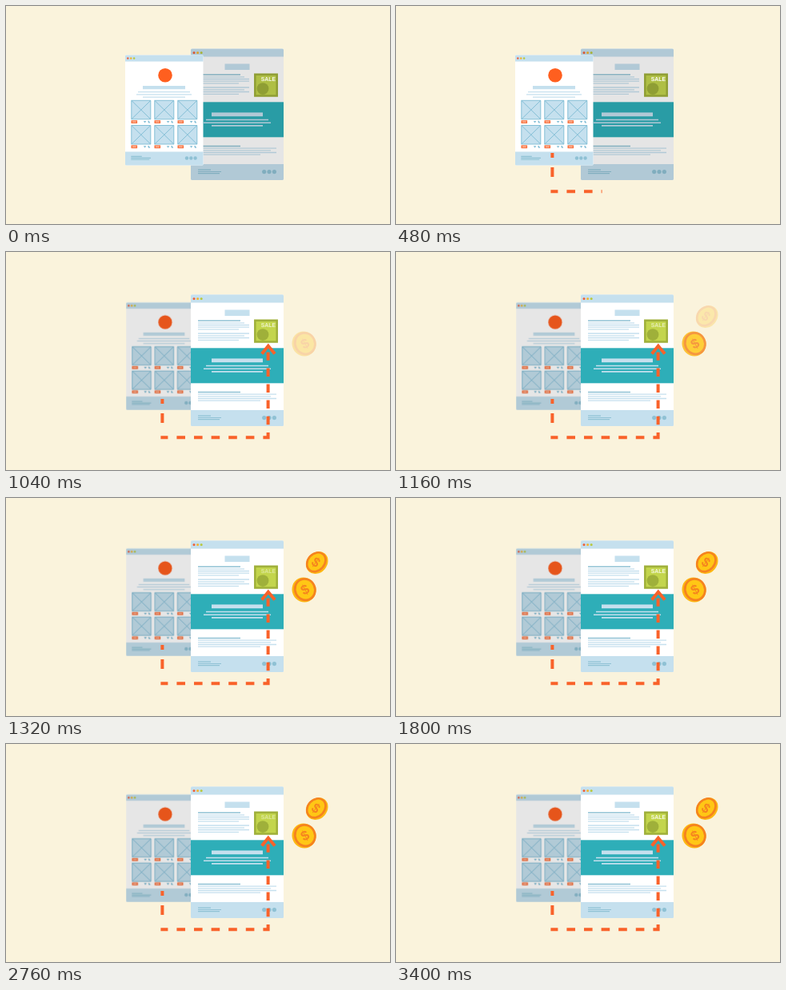
These frames come from a looping animation (480x273 px, 3440 ms). An HTML page:

```html
<!DOCTYPE html>
<html lang="en">
<head>
<meta charset="utf-8">
<title>Email to sale</title>
<style>
  html, body { margin: 0; width: 100%; height: 100%; overflow: hidden; background: #faf3dc; }
  svg { display: block; width: 100%; height: 100%; }

  .pale { fill: #c5e0ee; }
  .ink { fill: #8fc1d4; }
  .rule { stroke: #c5e0ee; stroke-width: 1.3; fill: none; }
  .head { stroke: #8fc1d4; stroke-width: 1.5; fill: none; }
  .thin { stroke: #8fc1d4; stroke-width: 1.1; fill: none; }
  .trail { stroke: #f9622a; stroke-width: 4; fill: none; }
  .sale { font: 900 6.8px "Liberation Sans", Arial, sans-serif; fill: #fff; }
  .dollar { font: 700 17px "Liberation Sans", Arial, sans-serif; fill: #f5831f; text-anchor: middle; }

  .shop, .dim, .front, .reveal, .sale, .coin { animation: 3440ms linear infinite; }
  .shop { animation-name: shrink; transform-origin: 198px 130.5px; }
  .dim { animation-name: dim; }
  .front { animation-name: front; }
  .reveal { animation-name: reveal; stroke-dasharray: 100 110; }
  .sale { animation-name: glow; }
  .first { animation-name: first; }
  .second { animation-name: second; }

  @keyframes shrink { 0%, 17.44% { transform: scale(1); } 29.07%, 100% { transform: scale(.975); } }
  @keyframes dim { 0%, 23.84% { opacity: 0; } 27.9%, 100% { opacity: .1; } }
  @keyframes front { 0%, 23.84% { opacity: 0; } 27.9%, 100% { opacity: 1; } }
  @keyframes reveal { 0%, 4.36% { stroke-dashoffset: 100.5; } 30.35%, 100% { stroke-dashoffset: 0; } }
  @keyframes glow {
    0% { opacity: .9; } 12% { opacity: 1; } 23.3% { opacity: .95; } 38.4% { opacity: .45; }
    58% { opacity: 1; } 66.3% { opacity: .95; } 80.2% { opacity: .45; } 100% { opacity: .9; }
  }
  @keyframes first { 0%, 28.49% { opacity: 0; } 34.88%, 100% { opacity: 1; } }
  @keyframes second { 0%, 32.27% { opacity: 0; } 38.37%, 100% { opacity: 1; } }
</style>
</head>
<body>
<svg viewBox="0 0 480 273" preserveAspectRatio="none">
  <defs>
    <g id="item">
      <path d="M.5.5H24.5V24H.5ZL24.5 24M24.5.5L.5 24" fill="#c5e0ee" stroke="#84bfd6"/>
      <rect x=".2" y="25.4" width="7.6" height="3.8" fill="#f9703c"/>
      <path d="M1.6 27.3H6.4" stroke="#fcd0bd" stroke-width="1.1"/>
      <path d="M15.5 26.2h3.6l-1.8 2.6zM21 26h1.4l1.6 2.7h-2.4z" fill="#84bfd6"/>
    </g>

    <g id="letter">
      <rect x="231" y="53.6" width="116" height="164.4" rx="1.5" fill="#fff"/>
      <path class="pale" d="M231 63.4V55.1q0-1.5 1.5-1.5h113q1.5 0 1.5 1.5v8.3zM231 198h116v18.5q0 1.5-1.5 1.5h-113q-1.5 0-1.5-1.5z"/>
      <circle cx="235" cy="58.5" r="1.5" fill="#f0603a"/>
      <circle cx="239.6" cy="58.5" r="1.5" fill="#f3b52f"/>
      <circle cx="244.2" cy="58.5" r="1.5" fill="#b9c93f"/>
      <rect class="pale" x="273.5" y="72.4" width="31" height="7.6"/>
      <path class="head" d="M240 86h53M240 175.4h53"/>
      <path class="rule" d="M240 88.8h58M240 91.5h64M240 94.2h64M240 96.9h51
        M240 102h64M240 104.8h58M240 107.5h64M240 110.3h51
        M240 178.2h98M240 180.9h91M240 183.5h98M240 186.2h78"/>
      <rect x="311.3" y="85.7" width="27.4" height="26.8" fill="#c3d54d" stroke="#9fb03a" stroke-width="2.5"/>
      <circle cx="321" cy="103.6" r="7.4" fill="#9fb03a"/>
      <rect x="231" y="120.3" width="116" height="44" fill="#2eaeb8"/>
      <rect class="pale" x="257" y="133.4" width="64" height="4.8"/>
      <path class="rule" style="stroke-width:1.6" d="M250 142.5h78M247 146.2h84M257 149.9h64"/>
      <path class="thin" d="M240 205.1h16M240 207.5h29M240 209.6h27"/>
      <g class="ink"><circle cx="322.7" cy="207.6" r="2.6"/><circle cx="329" cy="207.6" r="2.6"/><circle cx="335.4" cy="207.6" r="2.6"/></g>
    </g>

    <mask id="wipe" maskUnits="userSpaceOnUse" x="0" y="0" width="480" height="273">
      <path class="reveal" d="M195.4 184V232.2H327.6V112" pathLength="100" fill="none" stroke="#fff" stroke-width="22"/>
    </mask>
  </defs>

  <rect width="480" height="273" fill="#faf3dc"/>

  <use href="#letter"/>
  <rect x="231" y="53.6" width="116" height="164.4" rx="1.5" opacity=".1"/>

  <g class="shop">
    <rect x="149" y="61.5" width="97.5" height="138" rx="1.2" fill="#fff"/>
    <path class="pale" d="M149 69.5v-6.8q0-1.2 1.2-1.2h95.1q1.2 0 1.2 1.2v6.8zM149 182.4h97.5v15.9q0 1.2-1.2 1.2h-95.1q-1.2 0-1.2-1.2z"/>
    <circle cx="152.3" cy="65.5" r="1.25" fill="#f0603a"/>
    <circle cx="156.2" cy="65.5" r="1.25" fill="#f3b52f"/>
    <circle cx="160.1" cy="65.5" r="1.25" fill="#b9c93f"/>
    <circle cx="199" cy="86.8" r="8.8" fill="#ff5f1f"/>
    <rect class="pale" x="171" y="100" width="53" height="4.2"/>
    <path class="rule" d="M165 107.7h65M163 110.9h69M171 114.1h53"/>
    <use href="#item" x="156.3" y="117.8"/>
    <use href="#item" x="185.3" y="117.8"/>
    <use href="#item" x="214.3" y="117.8"/>
    <use href="#item" x="156.3" y="149"/>
    <use href="#item" x="185.3" y="149"/>
    <use href="#item" x="214.3" y="149"/>
    <path class="thin" d="M156.3 188.4h13.5M156.3 190.4h24.7M156.3 192.2h23"/>
    <g class="ink"><circle cx="226" cy="190.5" r="2.2"/><circle cx="231.3" cy="190.5" r="2.2"/><circle cx="236.6" cy="190.5" r="2.2"/></g>
    <rect class="dim" x="149" y="61.5" width="97.5" height="138" rx="1.2"/>
  </g>

  <use class="front" href="#letter"/>
  <text class="sale" x="318.8" y="93.6">SALE</text>

  <g class="trail" mask="url(#wipe)">
    <path d="M195.4 184V232.2H327.6V226" stroke-dasharray="6 12 12 16.2 9 11 10.6 11 10.6 11 10.6 11 10.6 11 10.6 11 20 0"/>
    <path d="M327.6 216.2V125.5" stroke-dasharray="10.5 9.6"/>
    <path d="M319.8 127.6L327.8 117.6L336 127.6"/>
  </g>

  <g class="coin first">
    <ellipse cx="372.4" cy="115" rx="14.8" ry="15.6" transform="rotate(-25 372.4 115)" fill="#fdb813"/>
    <ellipse cx="373.8" cy="114.6" rx="12.4" ry="13.4" transform="rotate(-25 373.8 114.6)" fill="#ffc715" stroke="#f5831f" stroke-width="2.8"/>
    <text class="dollar" transform="translate(373.6 114.6) rotate(-28)" y="6">$</text>
  </g>
  <g class="coin second">
    <ellipse cx="388.8" cy="81" rx="12.6" ry="15" transform="rotate(42 388.8 81)" fill="#fdb813"/>
    <ellipse cx="387.8" cy="80.2" rx="10.4" ry="13" transform="rotate(42 387.8 80.2)" fill="#ffc715" stroke="#f5831f" stroke-width="2.6"/>
    <text class="dollar" transform="translate(387.6 80.2) rotate(36) scale(.92 1)" y="6">$</text>
  </g>
</svg>
</body>
</html>
```
